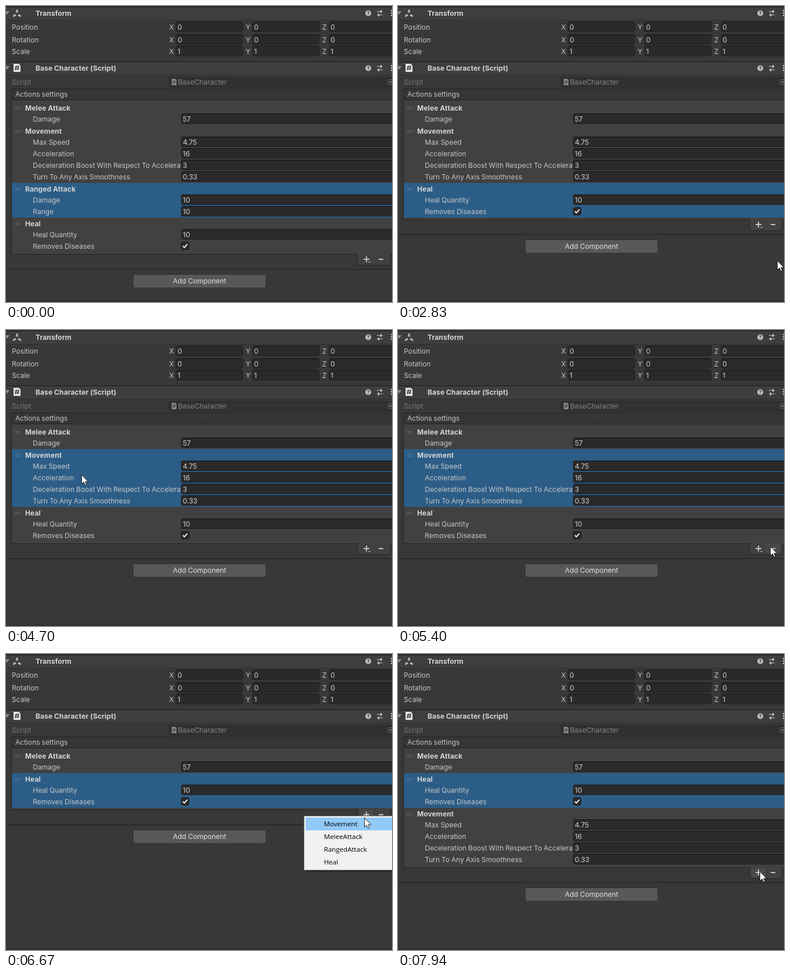
Animation, 666 px wide and 512 px high, one loop 8 s. Source, as an HTML page with a canvas:

```html
<!DOCTYPE html>
<html lang="en">
<head>
<meta charset="utf-8">
<title>Inspector list editing</title>
<style>
  html, body { margin: 0; width: 100%; height: 100%; overflow: hidden; background: #383838; }
  canvas { display: block; }
</style>
</head>
<body>
<canvas id="stage" width="666" height="512"></canvas>
<script>
const W = 666, H = 512, LOOP = 8000, TICK = 47.5, ROW = 20;
const ctx = document.getElementById('stage').getContext('2d');

const C = {
  back: '#383838', bar: '#3e3e3e', list: '#414141', head: '#353535',
  edge: '#242424', line: '#1f1f1f', field: '#2a2a2a', fieldEdge: '#202020',
  fieldTop: '#111111', text: '#c6c6c6', bold: '#d4d4d4', dim: '#7a7a7a',
  pick: '#2c5d87', icon: '#c4c4c4', button: '#585858'
};
const PLAIN = { font: '12px Inter, sans-serif', word: '-0.4px' };
const BOLD = { font: '700 12px Inter, sans-serif', letter: '0.1px' };
const MARK = { font: '700 9px Inter, sans-serif' };
const MENU_TYPE = { font: '11.6px "Open Sans", "Noto Sans", sans-serif' };

const ITEMS = {
  melee: { title: 'Melee Attack', rows: { 'Damage': '57' } },
  movement: { title: 'Movement', rows: {
    'Max Speed': '4.75', 'Acceleration': '16',
    'Deceleration Boost With Respect To Acceleration': '3',
    'Turn To Any Axis Smoothness': '0.33' } },
  ranged: { title: 'Ranged Attack', rows: { 'Damage': '10', 'Range': '10' } },
  heal: { title: 'Heal', rows: { 'Heal Quantity': '10', 'Removes Diseases': true } }
};

const STATES = [
  { t: 0, items: ['melee', 'movement', 'ranged', 'heal'], pick: 'ranged' },
  { t: 2830, items: ['melee', 'movement', 'heal'], pick: 'heal' },
  { t: 4460, items: ['melee', 'movement', 'heal'], pick: 'movement' },
  { t: 5450, items: ['melee', 'heal'], pick: 'heal' },
  { t: 7090, items: ['melee', 'heal', 'movement'], pick: 'heal' }
];

// Each trip glides from the previous stop to (x, y)
const TRIPS = [
  { t: 820, end: 1200, x: 23, y: 329 },
  { t: 1760, end: 1950, x: 690, y: 440 },
  { t: 2230, end: 2420, x: 654, y: 440 },
  { t: 3060, end: 3480, x: 3, y: 235 },
  { t: 3620, end: 4000, x: 22, y: 224 },
  { t: 4570, end: 5120, x: 642, y: 374 },
  { t: 5730, end: 6240, x: 622, y: 280 },
  { t: 6630, end: 6770, x: 600, y: 293 },
  { t: 7200, end: 7750, x: 621, y: 371 },
  { t: 7850, end: 7940, x: 624, y: 376 }
];
const ENTRY = { x: 252, y: 505 };
const CLICKS = [1430, 2690, 4420, 5310, 6290, 6950], HOLD = 90;
const MENU = { open: 6340, full: 6490, hover: 6630, close: 7050 };

const latest = (list, t) => list.filter(e => e.t <= t).pop();
const mix = (a, b, u) => Math.round(a + (b - a) * u);

function rect(x, y, w, h, color) {
  ctx.fillStyle = color;
  ctx.fillRect(x, y, w, h);
}

function rounded(x, y, w, h, r, fill, edge) {
  ctx.beginPath();
  ctx.roundRect(x + .5, y + .5, w - 1, h - 1, r);
  ctx.fillStyle = fill;
  ctx.fill();
  if (edge) { ctx.strokeStyle = edge; ctx.lineWidth = 1; ctx.stroke(); }
}

function poly(points, color) {
  ctx.beginPath();
  points.forEach(([x, y]) => ctx.lineTo(x, y));
  ctx.closePath();
  ctx.fillStyle = color;
  ctx.fill();
}

function stroke(points, color, width) {
  ctx.beginPath();
  points.forEach(([x, y]) => ctx.lineTo(x, y));
  ctx.strokeStyle = color;
  ctx.lineWidth = width;
  ctx.stroke();
}

function disc(x, y, r, color) {
  ctx.beginPath();
  ctx.arc(x, y, r, 0, Math.PI * 2);
  ctx.fillStyle = color;
  ctx.fill();
}

function text(s, x, y, color = C.text, type = PLAIN, align = 'left') {
  ctx.font = type.font;
  ctx.letterSpacing = type.letter || '0px';
  ctx.wordSpacing = type.word || '0px';
  ctx.fillStyle = color;
  ctx.textAlign = align;
  ctx.fillText(s, x, y);
}

function field(x, y, w, value) {
  rounded(x, y, w, 18, 2.5, C.field, C.fieldEdge);
  rect(x + 2, y, w - 4, 1, C.fieldTop);
  text(value, x + 3, y + 14, '#d2d2d2');
}

function titleBar(y, label) {
  rect(0, y, W, 1, '#1a1a1a');
  rect(0, y + 1, W, 22, C.bar);
  rect(0, y + 23, W, 1, '#303030');
  const m = y + 11;
  poly([[-2, m - 3], [6, m - 3], [2, m + 3]], '#8a8a8a');
  text(label, 51, m + 5, C.bold, BOLD);
  disc(625, m + .5, 5, C.icon);
  text('?', 625, m + 4, C.bar, MARK, 'center');
  for (const side of [-1, 1]) {
    rect(640, m + 3 * side, 10, 1, C.icon);
    rect(644 - 2 * side, m + 3 * side - 2, 2, 5, C.icon);
  }
  for (const d of [-4, 0, 4]) rect(664, m + d - 1, 2, 2, C.icon);
}

function pageIcon(x, y, w, h, page, mark) {
  const f = w / 4, u = w / 12, cx = x + w / 2, cy = y + h / 2;
  poly([[x, y], [x + w - f, y], [x + w, y + f], [x + w, y + h], [x, y + h]], page);
  for (const d of [-1.7 * u, 1.7 * u]) {
    stroke([[cx - 4 * u, cy + d], [cx + 4 * u, cy + d]], mark, 1.2 * u);
    stroke([[cx + d + u, cy - 4 * u], [cx + d - u, cy + 4 * u]], mark, 1.2 * u);
  }
}

// Three equal petals around one centre
function axisIcon(x, y) {
  for (let i = 0; i < 3; i++) {
    ctx.save();
    ctx.translate(x, y);
    ctx.rotate(i * Math.PI * 2 / 3);
    poly([[-1.2, -8], [1.2, -8], [1.8, -2.5], [-1.8, -2.5]], '#bcbcbc');
    ctx.restore();
  }
}

function drawTop() {
  rect(0, 0, W, H, C.back);
  titleBar(1, 'Transform');
  axisIcon(19, 14);
  [['Position', 27, '0'], ['Rotation', 49, '0'], ['Scale', 69, '1']].forEach(([name, y, value]) => {
    text(name, 10, y + 14);
    ['X', 'Y', 'Z'].forEach((axis, i) => {
      const x = 293 + 132 * i;
      text(axis, x - 11.5, y + 14);
      field(x, y, 116, value);
    });
  });

  titleBar(96, 'Base Character (Script)');
  pageIcon(13, 100, 12, 14, '#e6e6e6', '#303030');
  text('Script', 10, 136, C.dim);
  rounded(281, 123, 400, 18, 2.5, '#313131', '#2a2a2a');
  pageIcon(286, 126, 8, 11, '#8c8c8c', '#333333');
  text('BaseCharacter', 297, 136, '#858585');
  disc(664, 131.5, 5, C.dim);
  disc(664, 131.5, 4, '#313131');
  disc(664, 131.5, 1.7, C.dim);

  rounded(9, 143, 700, 20, 2.5, C.head, C.edge);
  text('Actions settings', 16, 157);
}

function label(s, y) {
  ctx.save();
  ctx.beginPath();
  ctx.rect(0, y - 14, 301, ROW);
  ctx.clip();
  text(s, 46.3, y);
  ctx.restore();
}

function checkbox(x, y) {
  rounded(x, y, 14, 14, 2.5, C.field, '#171717');
  stroke([[x + 3, y + 7], [x + 5.7, y + 9.7], [x + 11, y + 4]], '#e4e4e4', 2);
}

const heightOf = key => ROW * (Object.keys(ITEMS[key].rows).length + 1);

function drawItem(key, y, picked) {
  if (picked) rect(10, y, W, heightOf(key), C.pick);
  for (const d of [9, 12]) rect(15, y + d, 10, 1, picked ? '#557896' : '#6a6a6a');
  text(ITEMS[key].title, 33, y + 15, C.bold, BOLD);
  for (const [name, value] of Object.entries(ITEMS[key].rows)) {
    y += ROW;
    label(name, y + 14);
    if (value === true) checkbox(302, y + 2);
    else field(302, y, 400, value);
  }
}

function drawFooter(bottom, cursor) {
  const m = bottom + 8;
  rounded(606, bottom - 1, 58, 20, [0, 0, 3, 3], C.list, C.edge);
  rect(607, bottom - 1, 56, 1, C.list);
  for (const x of [622, 647]) {
    const over = cursor && Math.abs(cursor.x - x) < 12 && Math.abs(cursor.y - m) < 9;
    if (over) rounded(x - 12, m - 8, 25, 16, 2, '#4a4a4a');
  }
  rect(617, m - 1, 10, 2, C.icon);
  rect(621, m - 5, 2, 10, C.icon);
  poly([[625, m + 4], [629, m + 4], [627, m + 6]], C.icon);
  rect(643, m - 1, 8, 2, C.icon);

  rect(0, bottom + 25, W, 1, C.line);
  rounded(219, bottom + 34, 230, 24, 3, C.button, '#303030');
  text('Add Component', 334, bottom + 50, '#e2e2e2', PLAIN, 'center');
  rect(0, 510, W, 1, '#282828');
}

function drawList({ items, pick }, cursor) {
  const bottom = items.reduce((y, key) => y + heightOf(key), 170);
  rect(9, 163, W, bottom - 163, C.list);
  rect(9, 163, 1, bottom - 163, C.edge);
  let y = 166;
  for (const key of items) {
    drawItem(key, y, key === pick);
    y += heightOf(key);
  }
  rect(9, bottom - 1, W, 1, C.edge);
  drawFooter(bottom, cursor);
}

function drawMenu(t) {
  if (t < MENU.open || t >= MENU.close) return;
  ctx.save();
  ctx.globalAlpha = Math.min(1, .25 + .75 * (t - MENU.open) / (MENU.full - MENU.open));
  rect(518, 374, W, 3, 'rgba(0,0,0,.25)');
  rect(514, 280, W, 94, '#a6a6a6');
  rect(515, 281, W, 92, '#f1f1f1');
  if (t >= MENU.hover) rect(517, 283, W, 22, '#91c9f7');
  ['Movement', 'MeleeAttack', 'RangedAttack', 'Heal'].forEach((s, i) =>
    text(s, 548.5, 298 + 22 * i, '#000', MENU_TYPE));
  ctx.restore();
}

// Stepped glide, gentle at both ends
function cursorAt(t) {
  const trip = latest(TRIPS, t);
  if (!trip) return null;
  const from = TRIPS[TRIPS.indexOf(trip) - 1] || ENTRY;
  const steps = Math.round((trip.end - trip.t) / TICK);
  const done = Math.floor((t - trip.t) / (trip.end - trip.t) * steps + 1e-6);
  const p = Math.min(1, (done + 1) / (steps + 1));
  const u = .4 * p + .6 * p * p * (3 - 2 * p);
  return { x: mix(from.x, trip.x, u), y: mix(from.y, trip.y, u) };
}

function drawCursor(t, { x, y }) {
  if (CLICKS.some(c => t >= c && t < c + HOLD)) disc(x, y, 12, 'rgba(200,192,24,.75)');
  ctx.save();
  ctx.translate(x + .5, y + .5);
  poly([[0, 0], [0, 16], [3.7, 12.6], [6.2, 18], [8.6, 17], [6.2, 11.7], [11.2, 11.7]], '#fff');
  ctx.strokeStyle = '#111';
  ctx.lineWidth = .9;
  ctx.stroke();
  ctx.restore();
}

function draw(t) {
  const cursor = cursorAt(t);
  drawTop();
  drawList(latest(STATES, t), cursor);
  drawMenu(t);
  if (cursor) drawCursor(t, cursor);
}

const start = performance.now();
function tick() {
  draw((performance.now() - start) % LOOP);
  requestAnimationFrame(tick);
}
tick();
</script>
</body>
</html>
```
